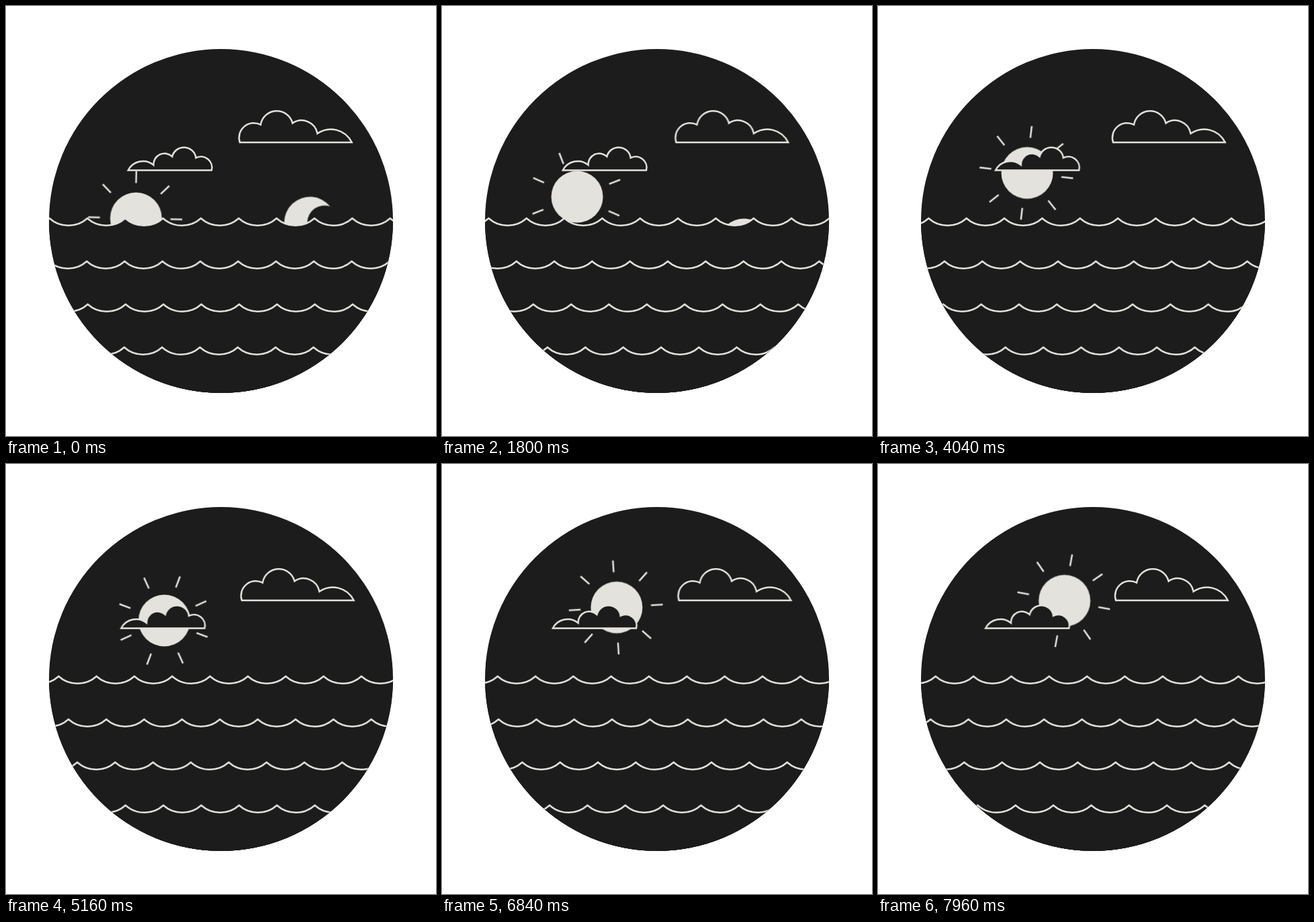
These frames come from a looping animation (640 by 640 pixels, 8000 ms). An HTML page without scripts:

```html
<!DOCTYPE html>
<html lang="en">
<head>
<meta charset="utf-8">
<title>Sun over the sea</title>
<style>
  :root { --ink: #1c1c1c; --pale: #e3e2dc; }
  html, body { margin: 0; width: 100%; height: 100%; overflow: hidden; background: #fff; }
  svg { display: block; width: 100%; height: 100%; }

  .line { fill: var(--ink); stroke: var(--pale); stroke-width: 2.5; stroke-miterlimit: 10; }
  .solid { fill: var(--pale); }
  .rays { fill: none; stroke: var(--pale); stroke-width: 2.5; }

  /* 72 poses: one at 0, then one every 112 ms from 120 ms on */
  .wave, .cloud, .sun, .moon, .rays { animation: 8s step-end infinite; }
  .wave { animation-name: drift; }
  .cloud { animation-name: glide; }
  .sun { animation-name: rise; }
  .moon { animation-name: sink; }
  .rays { animation-name: spin; }

  @keyframes drift {
    0% { transform: translateX(var(--d)); }
    1.5% { transform: translateX(calc(var(--d) * 2)); animation-timing-function: steps(70); }
    99.5%, 100% { transform: translateX(calc(var(--d) * 72)); }
  }
  @keyframes spin {
    0% { transform: rotate(1.394deg); }
    1.5% { transform: rotate(2.788deg); animation-timing-function: steps(70); }
    99.5%, 100% { transform: rotate(100.4deg); }
  }
  @keyframes sink {
    0% { transform: translate(452.5px, 322.5px); }
    1.5% { transform: translate(452.3px, 324.5px); animation-timing-function: steps(70); }
    99.5%, 100% { transform: translate(437px, 466.6px); }
  }
  @keyframes rise {
    0% { transform: translate(193.5px, 316px); }
    1.5% { transform: translate(193.7px, 314px); animation-timing-function: steps(8); }
    12.7% { transform: translate(196.9px, 297.8px); animation-timing-function: steps(7); }
    22.5% { transform: translate(201.1px, 284px); animation-timing-function: steps(10); }
    36.5% { transform: translate(210.3px, 265.5px); animation-timing-function: steps(10); }
    50.5% { transform: translate(222px, 248.4px); animation-timing-function: steps(10); }
    64.5% { transform: translate(235.6px, 233px); animation-timing-function: steps(7); }
    74.3% { transform: translate(246.5px, 223.3px); animation-timing-function: steps(8); }
    85.5% { transform: translate(259.9px, 213.5px); animation-timing-function: steps(10); }
    99.5%, 100% { transform: translate(277.6px, 203.5px); }
  }
  @keyframes glide {
    0% { transform: none; }
    1.5% { transform: translateX(calc(var(--d) * .003)); animation-timing-function: steps(15); }
    22.5% { transform: translateX(calc(var(--d) * .09)); animation-timing-function: steps(10); }
    36.5% { transform: translateX(calc(var(--d) * .18)); animation-timing-function: steps(10); }
    50.5% { transform: translateX(calc(var(--d) * .315)); animation-timing-function: steps(10); }
    64.5% { transform: translateX(calc(var(--d) * .48)); animation-timing-function: steps(15); }
    85.5% { transform: translateX(calc(var(--d) * .78)); animation-timing-function: steps(10); }
    99.5%, 100% { transform: translateX(var(--d)); }
  }
</style>
</head>
<body>
<svg viewBox="0 0 640 640">
  <defs>
    <clipPath id="disc"><circle cx="320" cy="320" r="256"/></clipPath>
    <path id="sea" d="M8.1 0
      a42.1 42.1 0 0 0 56.33 0 a42.1 42.1 0 0 0 56.33 0 a42.1 42.1 0 0 0 56.33 0
      a42.1 42.1 0 0 0 56.33 0 a42.1 42.1 0 0 0 56.33 0 a42.1 42.1 0 0 0 56.33 0
      a42.1 42.1 0 0 0 56.33 0 a42.1 42.1 0 0 0 56.33 0 a42.1 42.1 0 0 0 56.33 0
      a42.1 42.1 0 0 0 56.33 0 a42.1 42.1 0 0 0 56.33 0 V300 H8.1 Z"/>
    <path id="cross" d="M52.5 0H70M-52.5 0H-70M0 52.5V70M0-52.5V-70"/>
  </defs>

  <circle cx="320" cy="320" r="256" fill="#1c1c1c"/>
  <g clip-path="url(#disc)">
    <g class="sun">
      <circle class="solid" r="38.5"/>
      <g transform="translate(-1.2 0)">
        <g class="rays">
          <use href="#cross"/>
          <use href="#cross" transform="rotate(45)"/>
        </g>
      </g>
    </g>

    <path class="solid moon" d="M30-24.15A38.5 38.5 0 1 0 30 24.15A25.6 25.6 0 1 1 30-24.15Z"/>

    <path class="line cloud" style="--d: -21.7px" d="M181.8 244.5
      A24.7 24.7 0 0 1 219.5 236.6 A16.5 16.5 0 0 1 247.4 224
      A18 18 0 0 1 282.7 226 A16.3 16.3 0 0 1 306 244.5 Z"/>
    <path class="line cloud" style="--d: 6px" d="M348 203
      A22 22 0 0 1 379 176.6 A24.3 24.3 0 0 1 426.5 174.4
      A24 24 0 0 1 463.5 189.8 A34.8 34.8 0 0 1 514.7 203 Z"/>

    <g transform="translate(0 316)"><use class="line wave" href="#sea" style="--d: .2955px"/></g>
    <g transform="translate(0 380)"><use class="line wave" href="#sea" style="--d: -.591px"/></g>
    <g transform="translate(0 444)"><use class="line wave" href="#sea" style="--d: .8865px"/></g>
    <g transform="translate(0 508)"><use class="line wave" href="#sea" style="--d: -1.182px"/></g>
  </g>
</svg>
</body>
</html>
```
